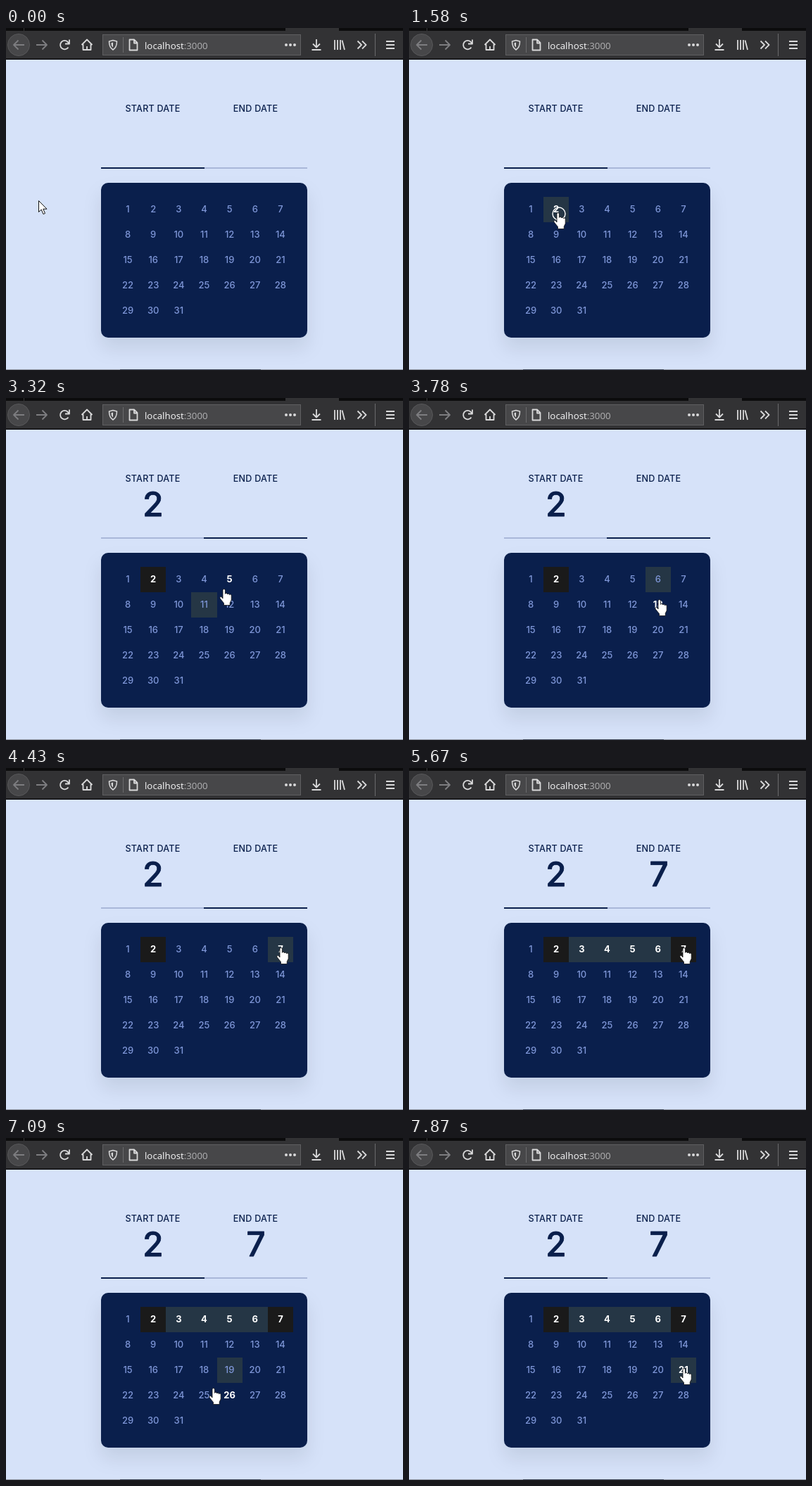
An HTML page that plays this animation: 564 by 486 pixels, repeating every 8000 ms.

```html
<!DOCTYPE html>
<html lang="en">
<head>
<meta charset="utf-8">
<title>Date range picker</title>
<style>
  html, body { margin: 0; width: 100%; height: 100%; overflow: hidden; background: #d6e2f9; }
  svg { display: block; width: 100%; height: 100%; }
  .page { font: 500 13px Inter, sans-serif; text-anchor: middle; fill: #0a1f4c; }
  .page .label { font-size: 12.6px; letter-spacing: .2px; }
  .page .big { font-size: 47.5px; stroke: #0a1f4c; stroke-width: .8; stroke-linejoin: round; }
  .card { filter: drop-shadow(0 15px 13px rgba(0, 12, 8, .09)); }
  .day { fill: #7f97d8; }
  .day.on { fill: #fff; font-weight: 700; }
  .url { font: 13.3px "Open Sans", sans-serif; fill: #f9f9fa; }
  .icon { fill: none; stroke: #d9d9da; stroke-width: 1.8; stroke-linejoin: round; }
  .off { stroke: #7d7d80; }
</style>
</head>
<body>
<svg viewBox="0 0 564 486">
  <rect width="564" height="486" fill="#d6e2f9"/>

  <g id="toolbar">
    <rect width="564" height="45" fill="#323234"/>
    <rect width="564" height="4" fill="#0c0c0d"/>
    <path d="M25.5 0V4" stroke="#38383a"/>
    <rect x="397" width="76" height="4" fill="#323234"/>
    <rect y="43.5" width="564" height="1.5" fill="#0c0c0d"/>
    <circle cx="18" cy="24" r="15.5" fill="#474749" stroke="#58585a"/>
    <rect x="137.5" y="9.5" width="281" height="29" fill="#474749" stroke="#5f5f61"/>
    <path d="M166.5 13V35M524.5 8V40" stroke="#6a6a6c"/>
    <g class="icon">
      <path class="off" d="M26 24H11M17.5 17.5L11 24L17.5 30.5M43 24H58M51.5 17.5L58 24L51.5 30.5"/>
      <path d="M88.5 27.5A6.2 6.2 0 1 1 87.5 19.5L89.5 22M90 16.5V22.5H84"/>
      <path d="M107.5 24L115 16.5L122.5 24M109.5 23V31H120.5V23M115 31V26"/>
      <path d="M152 17.5L157.5 19C157.5 25 156 28.5 152 31C148 28.5 146.5 25 146.5 19Z" stroke-width="1.5"/>
      <path d="M152 20.5V27.5C150 26 149.5 24 149.5 21.2Z" fill="#d9d9da" stroke="none"/>
      <path d="M175.5 16.5H182L186.5 21V31.5H175.5ZM182 17V21.5H186"/>
      <path d="M441 16V27M436 22.5L441 27.5L446 22.5M434.5 31H447.5"/>
      <path d="M467 17V31M471 17V31M475 17V31M477.5 17.5L481 31"/>
      <path d="M499.5 18.5L505 24L499.5 29.5M506 18.5L511.5 24L506 29.5"/>
      <path d="M540 19H552M540 24H552M540 29H552"/>
    </g>
    <path d="M398 24h.01M404 24h.01M410 24h.01" stroke="#d9d9da" stroke-width="4" stroke-linecap="round"/>
    <text class="url" x="197" y="29.5">localhost<tspan fill="#b1b1b3">:3000</tspan></text>
  </g>

  <g class="page">
    <text class="label" x="208.5" y="119">START DATE</text>
    <text class="label" x="354.5" y="119">END DATE</text>
    <text id="startValue" class="big" x="209" y="168">2</text>
    <text id="endValue" class="big" x="355" y="168">7</text>
    <rect x="135" y="198" width="293" height="2" fill="#a9b7d9"/>
    <rect id="underline" y="198" width="147" height="2"/>
    <rect class="card" x="135" y="220" width="293" height="220" rx="10"/>
    <g id="days"></g>
  </g>

  <path d="M0 485.5H564" stroke="#8b909b"/>
  <path d="M162 485.5H362" stroke="#3c4354"/>

  <circle id="ring" r="9" fill="none" stroke="#fff" stroke-width="1.4"/>
  <path id="arrow" fill="#fff" stroke="#111" d="M.5 .5V16.5L4.2 13L7 19.5L9.5 18.4L6.8 12.2H12Z"/>
  <path id="hand" fill="#fff" stroke="#111" stroke-width=".8" d="M5 14V2.2a1.7 1.7 0 0 1 3.4 0V7.4a1.6 1.6 0 0 1 3.1 .6a1.6 1.6 0 0 1 3 .8a1.5 1.5 0 0 1 2.7 1.2V16L15.2 20V23.5H6.5V20.5L1.2 14a1.5 1.5 0 0 1 2.3-2Z"/>
</svg>
<script>
const LOOP = 8000, LEFT = 155, TOP = 240, ROW = 36, COL = 253 / 7;
const START = 2, END = 7;
const $ = id => document.getElementById(id);

const linear = p => p;
const easeIn = p => p * p;
const easeInHard = p => p ** 3;
const easeOut = p => 1 - (1 - p) ** 2;
const easeInOut = p => p * p * (3 - 2 * p);

// The pointer moves in visible steps; sag bends the path downwards.
const moves = [
  { end: 480, steps: 3, gap: 160, to: [182, 266], ease: easeOut },
  { end: 870, steps: 3, gap: 130, to: [205, 262], ease: easeOut },
  { end: 2900, steps: 3, gap: 130, to: [285, 288], ease: linear },
  { end: 3320, steps: 1, gap: 160, to: [303, 271], ease: linear },
  { end: 3640, steps: 2, gap: 160, to: [334, 271], ease: easeOut },
  { end: 4430, steps: 6, gap: 130, to: [384, 255], ease: easeOut, sag: 24 },
  { end: 6150, steps: 2, gap: 160, to: [384, 286], ease: easeInHard },
  { end: 7090, steps: 7, gap: 130, to: [288, 355], ease: easeIn, sag: 10 },
  { end: 7870, steps: 6, gap: 130, to: [384, 327], ease: easeInOut, sag: 18 }
];

function dayUnder(x, y) {
  const col = Math.floor((x + 13 - LEFT) / COL), row = Math.floor((y + 1 - TOP) / ROW);
  return col < 0 || col > 6 || row < 0 ? 0 : row * 7 + col + 1;
}

const stops = [{ time: 0, x: 46, y: 245, day: 0 }];
for (const { end, steps, gap, to, ease, sag = 0 } of moves) {
  const from = stops.at(-1);
  for (let i = 1; i <= steps; i++) {
    const s = ease(i / steps);
    const x = from.x + (to[0] - from.x) * s;
    const y = from.y + (to[1] - from.y) * s + sag * 4 * s * (1 - s);
    stops.push({ time: end - (steps - i) * gap, x, y, day: dayUnder(x, y) });
  }
}

function add(name, parent, attrs) {
  const node = document.createElementNS('http://www.w3.org/2000/svg', name);
  for (const key in attrs) node.setAttribute(key, attrs[key]);
  return parent.appendChild(node);
}

const days = Array.from({ length: 31 }, (_, i) => {
  const left = LEFT + (i % 7) * COL, y = TOP + Math.floor(i / 7) * ROW;
  const x = Math.round(left), width = Math.round(left + COL) - x;
  const box = add('rect', $('days'), { x, y, width, height: ROW });
  const label = add('text', $('days'), { x: left + COL / 2, y: y + 22 });
  label.textContent = i + 1;
  return { box, label };
});

const show = (node, visible) => node.setAttribute('visibility', visible ? 'visible' : 'hidden');
const place = (node, x, y) => node.setAttribute('transform', `translate(${Math.round(x)} ${Math.round(y)})`);
const within = (t, from, to) => t >= from && t < to;

function cellFill(day, lit, startSet, rangeSet) {
  if (startSet && day === START || rangeSet && day === END) return '#1a1a1a';
  if (rangeSet && day > START && day < END || day === lit) return '#253645';
  return 'none';
}

function draw(t) {
  const now = stops.findLastIndex(stop => stop.time <= t);
  const { x, y, day: hovered } = stops[now];
  const lit = stops[Math.max(0, now - 1)].day; // the fill trails the label by one stop
  const picked = t >= 1760, done = t >= 5510;

  days.forEach(({ box, label }, i) => {
    const day = i + 1;
    const chosen = picked && day === START || done && day > START && day <= END;
    box.setAttribute('fill', cellFill(day, lit, t >= 1900, t >= 5670));
    label.setAttribute('class', chosen || day === hovered ? 'day on' : 'day');
  });

  show($('startValue'), picked);
  show($('endValue'), done);
  $('underline').setAttribute('x', picked && !done ? 281 : 135);

  show($('arrow'), t < 320);
  show($('hand'), t >= 320);
  place($('arrow'), x, y);
  place($('hand'), x, y);
  show($('ring'), within(t, 1580, 1760) || within(t, 5350, 5510));
  place($('ring'), x + 8, y + 1.5);
}

function tick() {
  draw(performance.now() % LOOP);
  requestAnimationFrame(tick);
}
tick();
</script>
</body>
</html>
```
